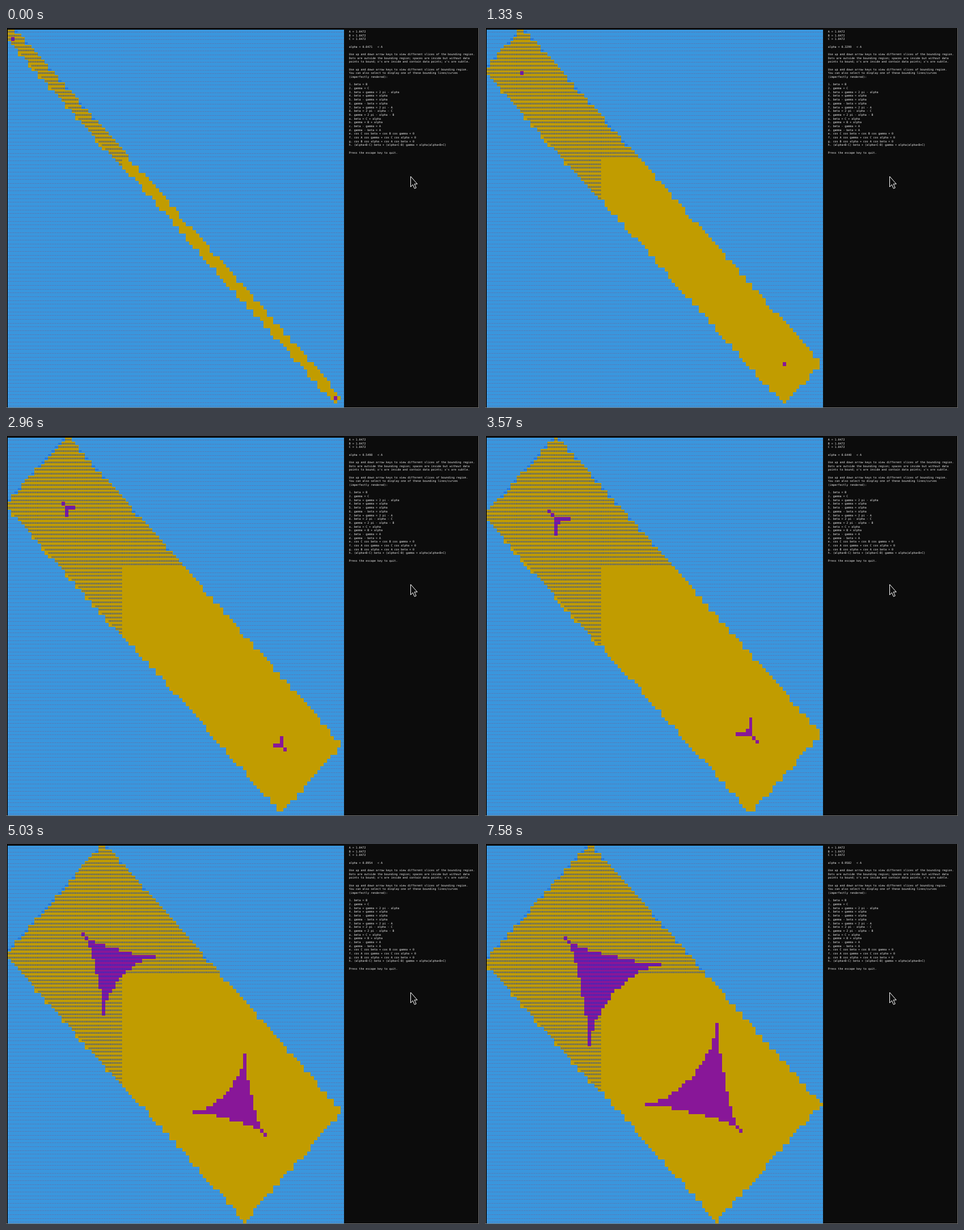
These frames come from a looping animation (834 px wide and 671 px high, 8000 ms). An HTML page with a canvas:

```html
<!DOCTYPE html>
<html lang="en">
<head>
<meta charset="utf-8">
<style>
  html, body { margin: 0; width: 100%; height: 100%; overflow: hidden; background: #0c0c0c; }
  canvas, svg { position: absolute; left: 0; top: 0; width: 834px; height: 671px; }
  text { font: 4.925px "DejaVu Sans Mono", monospace; fill: #f0f0f0; white-space: pre; text-rendering: geometricPrecision; }
</style>
</head>
<body>
<canvas id="grid" width="834" height="671"></canvas>
<svg viewBox="0 0 834 671">
  <path d="M.5 0 V670.5 H833.5 V0" fill="none" stroke="#777"/>
  <g id="panel"></g>
  <path d="M713.5 262 V280.5 L717.3 276.6 L720.4 283.5 L723.2 282.2 L720.2 275.4 H725.2 Z" fill="#0c0c0c" stroke="#fff"/>
</svg>
<script>
const LOOP = 8000, STEP = 120, SIZE = 100, LEFT = 3, TOP = 3, CW = 5.93, RH = 6.67;
const DATA_END = 34;
const SKY = '#3a96dd', GOLD = '#c19c00', PURPLE = '#881798', RED = '#c50f1f', BLUE = '#0037da';

// Each run: start time, then slice numbers one STEP apart; .5 is a half-finished redraw.
const runs = [
  [0, 1], [120, 1.5], [370, 2, 3, 4, 5, 6, 7, 8, 9, 10], [1580, 11, 12], [1950, 12.5, 13],
  [2330, 13.5, 14], [2600, 14.5, 15, 16, 17, 18], [3330, 18.5, 19, 20, 21, 22, 22.5, 23, 24],
  [4420, 25], [4670, 25.5, 26, 27, 28], [6320, 29], [7460, 29.5, 30]
];

const lines = `A = 1.0472
B = 1.0472
C = 1.0472

alpha = 0.0471   < A

Use up and down arrow keys to view different slices of the bounding region.
Dots are outside the bounding region; spaces are inside but without data
points to bound; o's are inside and contain data points; x's are subtle.

Use up and down arrow keys to view different slices of bounding region.
You can also select to display one of these bounding lines/curves
(imperfectly rendered):

1. beta = B
2. gamma = C
3. beta + gamma = 2 pi - alpha
4. beta + gamma = alpha
5. beta - gamma = alpha
6. gamma - beta = alpha
7. beta + gamma = 2 pi - A
8. beta = 2 pi - alpha - C
9. gamma = 2 pi - alpha - B
a. beta = C + alpha
b. gamma = B + alpha
c. beta - gamma = A
d. gamma - beta = A
e. cos C cos beta + cos B cos gamma = 0
f. cos A cos gamma + cos C cos alpha = 0
g. cos B cos alpha + cos A cos beta = 0
h. (alpha+B-C) beta + (alpha+C-B) gamma = alpha(alpha+B+C)

Press the escape key to quit.`.split('\n');

const panel = document.getElementById('panel');
const labels = lines.map((line, i) => {
  const t = document.createElementNS('http://www.w3.org/2000/svg', 'text');
  t.setAttribute('x', 604.8);
  t.setAttribute('y', TOP + i * RH + 5.1);
  t.textContent = line;
  panel.append(t);
  return t;
});

const ctx = document.getElementById('grid').getContext('2d');
const px = c => Math.round(LEFT + c * CW);
const py = r => Math.round(TOP + r * RH);

function noise(a, b, n) {
  const v = Math.sin(a * 12.9898 + b * 78.233 + n * 37.719) * 43758.5453;
  return v - Math.floor(v);
}

// Cells exactly on a bounding line fall to either side.
function inside(c, r, n) {
  const within = (v, limit, chance, k) =>
    v < limit || (v === limit && noise(r, k, n) < chance);
  const left = c < DATA_END ? within(r - c, n + 2, .25, 2) : within(r - c, n + 1, .6, 2);
  return left && within(c - r, n + 1, .7, 1) &&
    within(-c - r, 1 - n, .55, 3) && within(c + r, 197 - n, .4, 4);
}

function hasData(c, r, n) {
  return (c < DATA_END || r < DATA_END) && Math.abs(c - r) <= n + 1 && c + r >= n - 1;
}

// Three-pointed patch with hollow sides, symmetric in x and y.
function patch(n) {
  const near = n - Math.round(7 * (n / 30) ** 3.3);
  const arm = Math.round(20.55 * (n / 30) ** 4.3);
  const span = Math.max(1, n + arm - near);
  const side = v => {
    const w = Math.min(1, Math.max(0, 1 - (v - near) / span));
    return n - (n - near) * w ** (1.4 + 1.12 * w * w) - .03;
  };
  const reach = v => (Math.max(0, v - n) / Math.max(.5, arm)) ** .67;
  return (x, y) => y >= side(x) && x >= side(y) && reach(x) + reach(y) <= 1.002;
}

function glyphs(ch, color, c, count, r) {
  ctx.save();
  ctx.translate(LEFT + c * CW, TOP + r * RH + 5.1);
  ctx.scale(.1, .1);
  ctx.fillStyle = color;
  ctx.fillText(ch.repeat(2 * count), 0, 0);
  ctx.restore();
}

function drawRow(r, n) {
  const inPatch = patch(n);
  const cell = c => {
    if (c === SIZE) return '';
    const upper = inPatch(c, r - 1), lower = inPatch(98 - c, 98 - r);
    const bg = upper || lower ? PURPLE : inside(c, r, n) ? GOLD : SKY;
    return bg + (upper || hasData(c, r, n) ? 'o' : bg === SKY ? '.' : ' ');
  };
  let start = 0, kind = cell(0);
  for (let c = 1; c <= SIZE; c++) {
    const next = cell(c);
    if (next === kind) continue;
    const ch = kind[7];
    ctx.fillStyle = kind.slice(0, 7);
    ctx.fillRect(px(start), py(r), px(c) - px(start), py(r + 1) - py(r));
    if (ch !== ' ') glyphs(ch, ch === 'o' ? BLUE : RED, start, c - start, r);
    start = c;
    kind = next;
  }
}

function draw(slice) {
  const done = Math.floor(slice), split = (slice - done) * SIZE;
  ctx.fillStyle = '#0c0c0c';
  ctx.fillRect(0, 0, 834, 671);
  ctx.font = '49.25px "DejaVu Sans Mono", monospace';
  ctx.textRendering = 'geometricPrecision';
  for (let r = 0; r < SIZE; r++) drawRow(r, r < split ? done + 1 : done);
  const alpha = (Math.ceil(slice) + .5) * Math.PI / SIZE;
  labels[4].textContent = `alpha = ${alpha.toFixed(4)}   < A`;
}

function sliceAt(t) {
  const [start, ...values] = runs.findLast(run => run[0] <= t);
  return values[Math.min(values.length - 1, Math.floor((t - start) / STEP))];
}

let shown;
function tick() {
  const slice = sliceAt(performance.now() % LOOP);
  if (slice !== shown) draw(shown = slice);
  requestAnimationFrame(tick);
}
tick();
</script>
</body>
</html>
```
